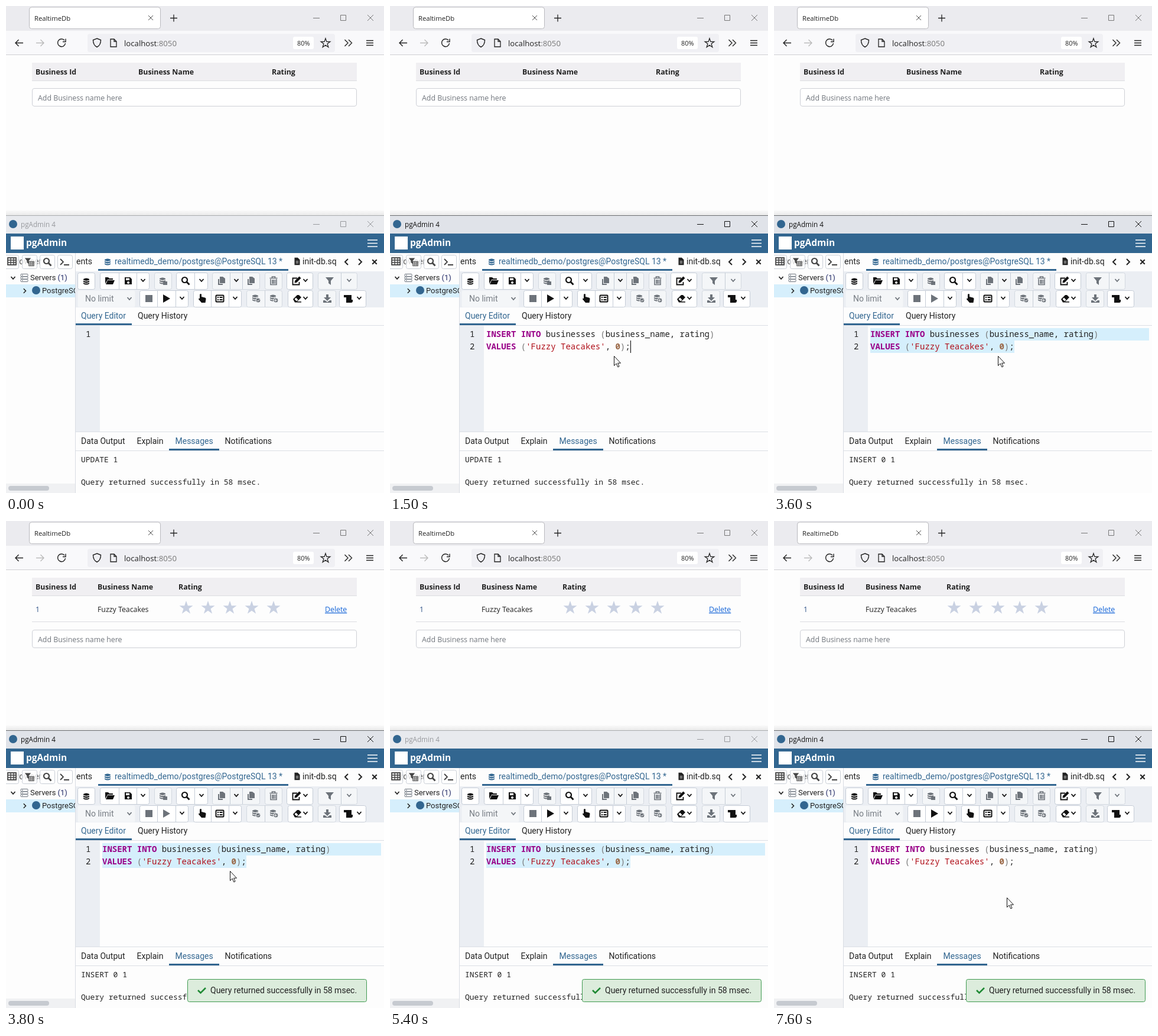
These frames come from a looping animation (640 by 824 pixels, 8000 ms). An HTML page:

```html
<!DOCTYPE html>
<html lang="en">
<head>
<meta charset="utf-8">
<title>RealtimeDb</title>
<style>
html, body { margin: 0; width: 100%; height: 100%; overflow: hidden; background: #fdfdfd; }
svg { display: block; width: 640px; height: 824px; }
text { white-space: pre; fill: #222; }
.ui { font: 12.35px "Open Sans", sans-serif; }
.ro { font: 14px Roboto, sans-serif; }
.tree { font-size: 13px; }
.code { font: 14px "Noto Sans Mono", monospace; }
.msg { font-size: 13px; }
.kw { fill: #908; font-weight: 700; }
.str { fill: #b0101a; }
.num { fill: #964; font-weight: 600; }
.br { fill: #777; }
.blue { fill: #326690; }
.cc { fill: currentColor; }
.ln { fill: none; stroke: currentColor; }
.btn { fill: #fff; stroke: #c5ccd6; }
.off { fill: #f4f6f8; stroke: #d3d9e0; }
.dim { color: #6d737a; }

/* every change happens in hard steps on one 8 s clock */
.t { animation: 8s step-end infinite; }
#title { animation-name: title; }
#caret { animation-name: caret; }
#sql { animation-name: sql; }
#sel { animation-name: sel; }
#play { animation-name: play; }
.before { animation-name: before; }
.after { animation-name: after; }
.empty { animation-name: empty; }
.filled { animation-name: filled; }
#toast { animation-name: toast; }
#mouse { animation-name: mouse; }

@keyframes title {
  0%, 67.5% { fill: #e8eaee; color: #989a9e; stroke: #a9abae; }
  11.25%, 88.75%, 100% { fill: #e0e3e9; color: #111; stroke: #6b6d70; }
}
@keyframes caret {
  0% { opacity: 0; transform: none; }
  12.5% { opacity: 1; transform: none; }
  18.75%, 30%, 88.75% { opacity: 1; transform: translate(244px, 21px); }
  23.75%, 36.25%, 95%, 100% { opacity: 0; transform: translate(244px, 21px); }
}
@keyframes sql { 0% { opacity: 0; } 18.75%, 100% { opacity: 1; } }
@keyframes sel { 0%, 88.75%, 100% { opacity: 0; } 40% { opacity: 1; } }
@keyframes play { 0%, 50%, 100% { color: #111; } 45% { color: #6d737a; } }
@keyframes before { 0% { opacity: 1; } 45%, 100% { opacity: 0; } }
@keyframes after { 0% { opacity: 0; } 45%, 100% { opacity: 1; } }
@keyframes empty { 0% { opacity: 1; } 46.25%, 100% { opacity: 0; } }
@keyframes filled { 0% { opacity: 0; } 46.25%, 100% { opacity: 1; } }
@keyframes toast {
  0%, 45% { transform: translateX(610px); }
  46.25% { transform: translateX(154px); }
  47.5% { transform: translateX(-18px); }
  48.75% { transform: translateX(-54px); }
  50% { transform: translateX(-36px); }
  51.25%, 100% { transform: none; }
}
@keyframes mouse {
  0%, 62.5% { transform: translate(700px, 592px); }
  6.25% { transform: translate(440px, 680px); }
  7.5% { transform: translate(415px, 665px); }
  8.75% { transform: translate(391px, 618px); }
  10% { transform: translate(379px, 592px); }
  61.25% { transform: translate(422px, 592px); }
  83.75% { transform: translate(456px, 714px); }
  85% { transform: translate(380px, 687px); }
  86.25% { transform: translate(391px, 667px); }
  87.5%, 100% { transform: translate(394px, 637px); }
}
</style>
</head>
<body>
<svg viewBox="0 0 640 824" xmlns="http://www.w3.org/2000/svg">
<defs>
  <path id="star" d="M0-12 2.8-3.8 11.5-3.7 4.5 1.5 7.1 9.8 0 4.8-7.1 9.8-4.5 1.5-11.5-3.7-2.8-3.8z"/>
  <path id="chev" class="ln" stroke-width="1.8" d="M-3.5-2 0 2 3.5-2"/>
  <path id="chevR" class="ln" stroke-width="2" d="M-3-5 2 0-3 5"/>
  <path id="cross" class="ln" d="M-5-5 5 5M5-5-5 5"/>
  <g id="win"><path class="ln" d="M520 0.5h11M566.500-4.500h9v9h-9z"/><use href="#cross" x="617"/></g>
  <g id="db">
    <path class="cc" d="M-5-4q5-3 10 0v8q-5 3-10 0z"/>
    <path d="M-5-2q5 3 10 0M-5 1.500q5 3 10 0" fill="none" stroke="#fff" stroke-width="1.200"/>
  </g>
  <g id="lens"><circle class="ln" cx="-1.500" cy="-1.500" r="4.500" stroke-width="2.200"/><path class="ln" stroke-width="2.800" d="M2 2 6.500 6.500"/></g>
  <path id="funnel" class="cc" d="M-7-6H7L2 0V7L-2 4V0z"/>
  <g id="copy"><path class="cc" d="M-6-3h2v8h6v2h-8z"/><path class="cc" d="M-3-7h5l4 3v8h-9z"/></g>
  <g id="page"><path class="cc" d="M-5-7h6l4 4V7H-5z"/><path d="M-2.500 0h5M-2.500 3h5" stroke="#fff"/></g>
  <g id="grid"><rect class="ln" x="-7" y="-6" width="14" height="12" stroke-width="1.800"/><path class="ln" stroke-width="1.400" d="M-7-2H7M-7 2H7M-2-6V6M3-6V6"/></g>
  <g id="server" fill="#fff" stroke="#6f7780"><rect x="-6" y="-6.500" width="12" height="4" rx="1"/><rect x="-6" y="-2" width="12" height="4" rx="1"/><rect x="-6" y="2.500" width="12" height="4" rx="1"/><path d="M-4-4.500h2M-4 0h2M-4 4.500h2"/></g>
  <linearGradient id="shade" x2="0" y2="1"><stop stop-color="#f9f9f9"/><stop offset="1" stop-color="#eaeaea"/></linearGradient>
  <clipPath id="side"><path d="M0 418h117v406H0z"/></clipPath>
  <clipPath id="bar"><path d="M118 449h522v61H118z"/></clipPath>
</defs>

<!-- browser -->
<path fill="#fdfdfd" d="M0 0h640v824H0z"/>
<path fill="#ebebef" d="M0 0h640v42H0z"/>
<path fill="#f9f9fb" d="M0 42h640v40H0z"/>
<path stroke="#cfcfd3" d="M0 82.500h640"/>
<rect x="39.500" y="2" width="222" height="36.500" rx="4" fill="#fff" stroke="#b9b9be"/>
<text class="ui" x="48" y="25" style="font-size:11.250px">RealtimeDb</text>
<g color="#222">
  <use href="#cross" transform="translate(245 20) scale(.8)"/>
  <path class="ln" stroke-width="1.300" d="M278 20.500h12M284 14.500v12"/>
  <g color="#777"><use href="#win" y="20"/></g>
  <path class="ln" stroke-width="1.400" d="M29 62.500H16M21.500 57 16 62.500l5.500 5.500"/>
  <path class="ln" color="#bbb" stroke-width="1.400" d="M51 62.500h13M58.500 57l5.500 5.500-5.500 5.500"/>
  <path class="ln" stroke-width="1.400" d="M99 58a6.500 6.500 0 1 0 1.500 5M101 55.500v5h-5"/>
  <rect x="138" y="47" width="419" height="31" rx="4" fill="#f0f0f4"/>
  <path class="ln" stroke-width="1.400" d="M154 55l6.500 2.500c0 6-1.500 9.500-6.500 12-5-2.500-6.500-6-6.500-12z"/>
  <path class="ln" stroke-width="1.300" d="M177 56h6l4 4v9h-10zM183 56v4h4"/>
  <text class="ui" x="200" y="68" style="font-size:13.200px">localhost<tspan fill="#777">:8050</tspan></text>
  <rect x="486" y="52" width="35" height="21" rx="3" fill="#fff"/>
  <text class="ui" x="493" y="67" style="font-size:10.900px">80%</text>
  <use href="#star" class="ln" stroke-width="1.900" transform="translate(541 63) scale(.68)"/>
  <path class="ln" stroke-width="1.400" d="M573.500 57l5.500 5.500-5.500 5.500M580 57l5.500 5.500-5.500 5.500M610 58.500h12M610 62.500h12M610 66.500h12"/>
</g>

<!-- page table -->
<path fill="#f0eff2" d="M44 96h550v30H44z"/>
<path stroke="#dcdde1" d="M44 126.500h550"/>
<text class="ui" x="50" y="116" font-weight="700" style="font-weight:700">Business Id</text>
<g class="t empty ui">
  <g style="font-weight:700"><text x="224" y="116">Business Name</text><text x="450" y="116">Rating</text></g>
  <rect x="44.500" y="139.500" width="549" height="30" rx="3.500" fill="#fff" stroke="#ced0d6"/>
  <text x="54" y="160" style="fill:#70757c">Add Business name here</text>
</g>
<g class="t filled ui">
  <g style="font-weight:700"><text x="155" y="116">Business Name</text><text x="292" y="116">Rating</text></g>
  <text x="50" y="154" style="fill:#2f5288">1</text>
  <text x="155" y="154">Fuzzy Teacakes</text>
  <g fill="#c9d1e2"><use href="#star" x="305" y="147"/><use href="#star" x="342" y="147"/><use href="#star" x="379" y="147"/><use href="#star" x="416" y="147"/><use href="#star" x="453" y="147"/></g>
  <text x="540" y="154" text-decoration="underline" style="fill:#1565d8">Delete</text>
  <path stroke="#dcdde1" d="M44 170.500h550"/>
  <rect x="44.500" y="184.500" width="549" height="30" rx="3.500" fill="#fff" stroke="#ced0d6"/>
  <text x="54" y="205" style="fill:#70757c">Add Business name here</text>
</g>

<!-- admin window -->
<path fill="url(#shade)" d="M0 346h640v8H0z"/>
<g id="title" class="t">
  <path stroke="none" d="M0 355h640v30H0z"/>
  <path d="M0 354.500h640"/>
  <circle cx="12" cy="369" r="7" fill="#326690" stroke="none"/>
  <text class="ui cc" x="25" y="374" stroke="none" style="font-size:11.700px;fill:currentColor">pgAdmin 4</text>
  <use href="#win" y="369"/>
</g>
<path class="blue" d="M0 385h640v33H0z"/>
<rect x="8" y="390" width="22" height="22" fill="#fff"/>
<text class="ui" x="34" y="406" style="font-size:15.500px;font-weight:700;fill:#fff">pgAdmin</text>
<path stroke="#fff" stroke-width="1.500" d="M612 396h17M612 401.500h17M612 407h17"/>

<!-- object tree -->
<g clip-path="url(#side)" class="ro" color="#444">
  <text x="9" y="437" style="fill:#555">Browser</text>
  <g fill="#fff" fill-opacity=".8" stroke="#c9ced6"><rect x="-3.500" y="421.500" width="25" height="23" rx="3"/><rect x="27.500" y="421.500" width="25" height="23" rx="3"/><rect x="57.500" y="421.500" width="25" height="23" rx="3"/><rect x="87.500" y="421.500" width="25" height="23" rx="3"/></g>
  <use href="#grid" x="10" y="432"/>
  <use href="#funnel" transform="translate(37 431) scale(.75)"/><use href="#grid" transform="translate(43 436) scale(.6)"/>
  <use href="#lens" x="70" y="433"/>
  <path class="ln" stroke-width="1.800" d="M92 428l5 5-5 5M98 438h9"/>
  <path fill="#d6effc" d="M0 471h117v22H0z"/>
  <g color="#222"><use href="#chev" x="12" y="460"/><use href="#chevR" transform="translate(32 482) scale(.75)"/></g>
  <use href="#server" x="31" y="460"/>
  <circle cx="51" cy="481" r="7" fill="#326690"/>
  <text class="tree" x="41" y="464">Servers <tspan style="fill:#222a66">(1)</tspan></text>
  <text class="tree" x="61" y="486">PostgreSQL 13</text>
  <path fill="#f0f1f3" d="M0 808h117v16H0z"/>
  <rect x="4" y="812" width="69" height="8" rx="4" fill="#c6cad0"/>
</g>
<path stroke="#d9dde3" d="M117.500 418v406"/>

<!-- document tabs -->
<g class="ro" color="#222">
  <text x="119" y="437">ents</text>
  <g color="#326690"><use href="#db" x="172" y="433"/></g>
  <text x="184" y="437" style="fill:#326690">realtimedb_demo/postgres@PostgreSQL 13 *</text>
  <path class="blue" d="M156 445h322v3H156z"/>
  <use href="#page" transform="translate(493 432) scale(.9)"/>
  <text x="502" y="437">init-db.sq</text>
  <use href="#chevR" transform="translate(576 433) scale(-1 1)"/><use href="#chevR" x="600" y="433"/>
  <use href="#cross" transform="translate(624 433) scale(.75)" stroke-width="2.800"/>
</g>

<!-- toolbar -->
<path fill="#ebeef3" d="M118 449h522v61H118z"/>
<g clip-path="url(#bar)" color="#111">
  <g class="btn">
    <rect x="121.500" y="451.500" width="29" height="28" rx="3"/><rect x="159.500" y="451.500" width="83" height="28" rx="3"/><rect x="288.500" y="451.500" width="53" height="28" rx="3"/><rect x="475.500" y="451.500" width="44" height="28" rx="3"/>
    <rect x="226.500" y="481.500" width="82" height="28" rx="3"/><rect x="317.500" y="481.500" width="81" height="28" rx="3"/><rect x="477.500" y="481.500" width="42" height="28" rx="3"/><rect x="564.500" y="481.500" width="45" height="28" rx="3"/>
  </g>
  <g class="off">
    <rect x="251.500" y="451.500" width="29" height="28" rx="3"/><rect x="349.500" y="451.500" width="80" height="28" rx="3"/><rect x="438.500" y="451.500" width="29" height="28" rx="3"/><rect x="528.500" y="451.500" width="66" height="28" rx="3"/>
    <rect x="121.500" y="481.500" width="97" height="28" rx="3" stroke="none"/><rect x="407.500" y="481.500" width="60" height="28" rx="3"/><rect x="528.500" y="481.500" width="30" height="28" rx="3"/>
  </g>
  <path class="btn" d="M191.500 451v28M221.500 451v28M319.500 451v28M379.500 451v28M400.500 451v28M567.500 451v28M256.500 481v28M287.500 481v28M347.500 481v28M377.500 481v28M438.500 481v28"/>

  <use href="#db" x="136" y="466"/>
  <path class="cc" d="M168 459h5l2 2h6v2h-9l-4 7zM172 464h12l-3 7h-12z"/>
  <path class="cc" fill-rule="evenodd" d="M201 459h9l3 3v9h-12zM203 460.500v3.500h6v-3.500zM207 466a2 2 0 1 0 .1 0z"/>
  <use href="#chev" x="232" y="464"/>
  <g class="dim">
    <use href="#db" x="265" y="465"/><path class="cc" d="M266 466h7v6h-7z"/>
    <use href="#copy" x="365" y="465"/><use href="#copy" x="415" y="465"/>
    <path class="ln" stroke-width="1.600" d="M446.500 460.500h13M450.500 460v-2h5v2M448 462v9.500h10V462M451 463v7M453 463v7M455.500 463v7"/>
    <use href="#funnel" x="548" y="465"/><use href="#chev" x="581" y="464"/>
    <path class="cc" d="M236 489h12v12h-12z"/>
    <use href="#chev" x="209" y="495"/>
    <use href="#db" x="422" y="494"/><circle class="cc" cx="427" cy="498" r="4" stroke="#f4f6f8"/><path d="M425 498l1.500 1.500 3-3" fill="none" stroke="#fff"/>
    <use href="#db" x="452" y="494"/><circle class="cc" cx="457" cy="498" r="4" stroke="#f4f6f8"/><path d="M455 498h4M457 496l-2 2 2 2" fill="none" stroke="#fff"/>
    <path class="cc" d="M542 488h4v5h4l-6 6-6-6h4zM537 498h3l4 3 4-3h3v4h-14z"/>
  </g>
  <use href="#lens" x="304" y="465"/><use href="#chev" x="331" y="464"/><use href="#chev" x="390" y="464"/>
  <path class="ln" stroke-width="1.800" d="M493 460.500h-7.500v11h11V467"/><path class="cc" d="M489 465l7.500-7.500 3 3-7.500 7.500-3.500.5z"/>
  <use href="#chev" x="507" y="464"/>
  <text class="ro" x="134" y="500" style="fill:#777d84">No limit</text>
  <g id="play" class="t"><path class="cc" d="M266 488l12 7-12 7z"/></g>
  <use href="#chev" x="298" y="494"/>
  <path class="cc" d="M328 488q2-2 3 0v4l6 1.500q2 .5 1.500 2.500l-1 6h-6.500l-5-6q0-2 2-1z"/>
  <rect class="ln" x="355.500" y="489.500" width="13" height="11" rx="1" stroke-width="2"/><path class="ln" stroke-width="1.800" d="M358 493h2M361.500 493h5M358 497h2M361.500 497h5"/>
  <use href="#chev" x="388" y="494"/>
  <path class="cc" fill-rule="evenodd" d="M486 496l7-7h3l4 4-7 7h7v1.500h-11zM488.500 496l3.500 3.500 2.500-2.500-3.500-3.500z"/>
  <use href="#chev" x="507" y="494"/>
  <path class="cc" d="M572 489h13v8h2q1 5-3 5h-8v-9h-4z"/>
  <use href="#chev" x="598" y="494"/>
</g>

<!-- query editor -->
<path fill="#ebeef3" d="M118 541h41v179h-41z"/>
<path stroke="#dbdfe5" d="M118 540.500h522M118 720.500h522M118 752.500h522"/>
<path class="blue" d="M118 537h95v3h-95zM276 749h85v3h-85z"/>
<g class="ro">
  <text x="127" y="529" style="fill:#326690">Query Editor</text>
  <text x="223" y="529">Query History</text>
  <text x="127" y="741">Data Output</text>
  <text x="221.500" y="741">Explain</text>
  <text x="286.500" y="741" style="fill:#326690">Messages</text>
  <text x="370.500" y="741">Notifications</text>
</g>
<path id="sel" class="t" fill="#d5effc" d="M163 545h472v21H407v21H163z"/>
<text class="code" x="135" y="560">1</text>
<g id="sql" class="t code">
  <text x="135" y="581">2</text>
  <text x="163" y="560"><tspan class="kw">INSERT INTO</tspan> businesses <tspan class="br">(</tspan>business_name, rating<tspan class="br">)</tspan></text>
  <text x="163" y="581"><tspan class="kw">VALUES</tspan> <tspan class="br">(</tspan><tspan class="str">'Fuzzy Teacakes'</tspan>, <tspan class="num">0</tspan><tspan class="br">)</tspan>;</text>
</g>
<path id="caret" class="t" fill="#000" d="M163 545h1v21h-1z"/>
<g class="code msg">
  <text class="t before msg" x="127" y="772">UPDATE 1</text>
  <text class="t after msg" x="127" y="772">INSERT 0 1</text>
  <text x="127" y="810">Query returned successfully in 58 msec.</text>
</g>

<g id="toast" class="t">
  <rect x="325.500" y="775.500" width="303" height="38" rx="3" fill="#dcecdc" stroke="#3f9a50"/>
  <path d="M343 794l4.500 4.500 8.500-8.500" fill="none" stroke="#1f8a34" stroke-width="2.600"/>
  <text class="ro" x="364" y="799">Query returned successfully in 58 msec.</text>
</g>
<g id="mouse" class="t">
  <path d="M.5.5v16l3.700-3.500 2.600 5.900 2.300-1-2.500-5.700h4.900z" fill="#fff" stroke="#111"/>
</g>
</svg>
</body>
</html>
```
